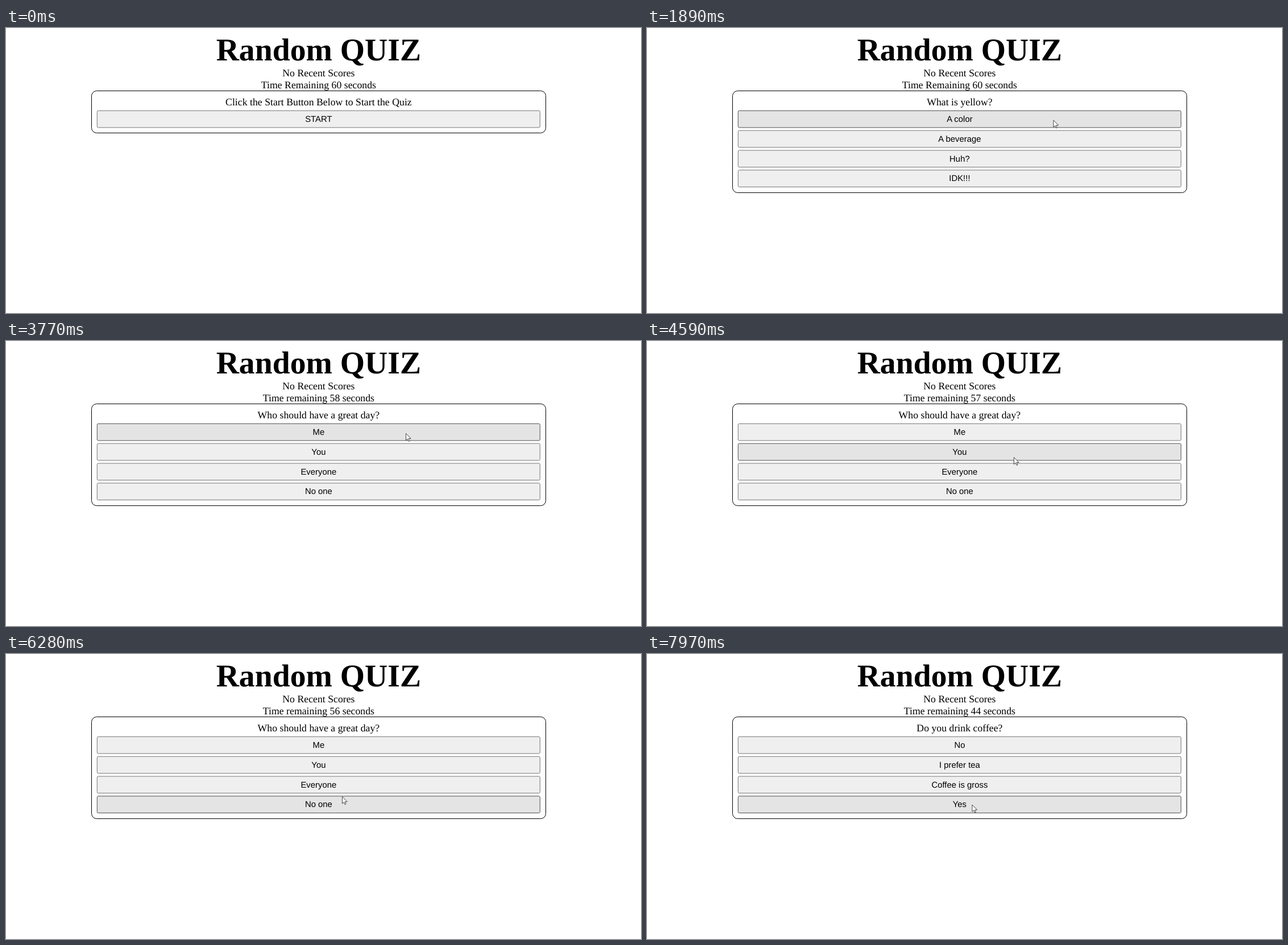
Recreate the animation shown at these times as an HTML page. Size 1117 by 501 pixels, loop 8 s.

```html
<!DOCTYPE html>
<html lang="en">
<head>
<meta charset="utf-8">
<title>Random QUIZ</title>
<style>
  html, body { margin: 0; width: 100%; height: 100%; overflow: hidden; background: #fff; }
  svg { display: block; }
  text { text-anchor: middle; text-rendering: geometricPrecision; fill: #000; }
  .serif { font: 17.78px "Liberation Serif", "Times New Roman", serif; }
  .title { font: bold 55.7px "Liberation Serif", "Times New Roman", serif; }
  .label { font: 14.9px "Liberation Sans", Arial, sans-serif; }
</style>
</head>
<body>
<svg id="stage" width="1117" height="501" viewBox="0 0 1117 501"></svg>
<script>
const LOOP = 8000;
const CENTER = 549.9;
const PITCH = 34.8;
const BUTTON = { x: 160.3, y: 145.4, width: 779, height: 29.6 };

const stage = document.getElementById('stage');

function set(node, attrs) {
  for (const key in attrs) node.setAttribute(key, attrs[key]);
}

function add(tag, attrs, text = '') {
  const node = document.createElementNS('http://www.w3.org/2000/svg', tag);
  set(node, attrs);
  node.textContent = text;
  stage.appendChild(node);
  return node;
}

function addText(cls, y, text) {
  return add('text', { class: cls, x: CENTER, y }, text);
}

const show = visible => ({ visibility: visible ? 'visible' : 'hidden' });

// A press on one screen leads to the next
const screens = [
  { start: 0, press: 1430, question: 'Click the Start Button Below to Start the Quiz',
    answers: ['START'] },
  { start: 1560, press: 2710, question: 'What is yellow?',
    answers: ['A color', 'A beverage', 'Huh?', 'IDK!!!'] },
  { start: 3770, press: 6740, question: 'Who should have a great day?',
    answers: ['Me', 'You', 'Everyone', 'No one'] },
  { start: 6870, press: LOOP, question: 'Do you drink coffee?',
    answers: ['No', 'I prefer tea', 'Coffee is gross', 'Yes'] }
];

const TICK = 1010;
const CLOCK_START = 1550;
const PENALTY = 10;

// The pointer glides to each stop, arriving at the given time
const ENTER = 200;
const GLIDE = 280;
const STEP = 68;
const stops = [
  { at: 1140, x: 714.5, y: 161.5 },
  { at: 2640, x: 703, y: 162 },
  { at: 4260, x: 645, y: 204 },
  { at: 5400, x: 621.5, y: 211.5 },
  { at: 5940, x: 590, y: 257 },
  { at: 6350, x: 592, y: 244 },
  { at: 7540, x: 583, y: 198 },
  { at: 7970, x: 571.5, y: 264.5 }
];

const looks = {
  normal: { fill: '#efefef', stroke: '#767676' },
  hover: { fill: '#e4e4e4', stroke: '#4f4f4f' },
  active: { fill: '#f5f5f5', stroke: '#8d8d8d' }
};

addText('title', 56.5, 'Random QUIZ');
addText('serif', 85.3, 'No Recent Scores');
const timer = addText('serif', 105.5, '');
const card = add('rect', {
  x: 150.5, y: 110.5, width: 799, rx: 9, fill: 'none', stroke: '#000'
});
const prompt = addText('serif', 135.8, '');
const buttons = [0, 1, 2, 3].map(i => {
  const y = BUTTON.y + PITCH * i;
  return {
    top: y,
    box: add('rect', { ...BUTTON, y, rx: 2 }),
    label: addText('label', y + 19.6, '')
  };
});
const halo = add('circle', { r: 11, fill: '#f9f678' });
const pointer = add('path', {
  d: 'M0 0V12.3L2.8 9.7L4.7 14L6.5 13.2L4.7 9H8.7Z',
  fill: '#fff', stroke: '#333', 'stroke-width': 0.9, 'stroke-linejoin': 'round'
});

const clamp = p => Math.max(0, Math.min(1, p));
const smooth = p => p * p * (3 - 2 * p);
const easeOut = p => 1 - (1 - p) ** 3;

function pointerAt(t) {
  let x = 979, y = 451;
  stops.forEach((stop, i) => {
    const time = i ? GLIDE : stop.at - ENTER;
    // Motion is sampled in coarse steps that land on the arrival
    const left = Math.ceil((stop.at - t) / STEP) * STEP;
    const p = (i ? smooth : easeOut)(clamp(1 - left / time));
    x += (stop.x - x) * p;
    y += (stop.y - y) * p;
  });
  return { x, y };
}

function secondsAt(t) {
  const ticks = Math.max(0, Math.floor((t - CLOCK_START) / TICK));
  return 60 - ticks - (t >= screens[3].start ? PENALTY : 0);
}

function draw(t) {
  const { press, question, answers } = screens.filter(s => s.start <= t).pop();
  const seconds = secondsAt(t);
  const { x, y } = pointerAt(t);
  const entered = t >= ENTER;
  const pressed = t >= press;

  timer.textContent = `Time ${seconds === 60 ? 'Remaining' : 'remaining'} ${seconds} seconds`;
  prompt.textContent = question;
  card.setAttribute('height', 74 + (answers.length - 1) * 35);

  buttons.forEach(({ top, box, label }, i) => {
    const over = entered && y >= top && y <= top + BUTTON.height;
    const look = !over ? 'normal' : pressed ? 'active' : 'hover';
    set(box, { ...looks[look], ...show(i < answers.length) });
    label.textContent = answers[i] || '';
  });

  set(halo, { cx: x, cy: y, ...show(pressed) });
  set(pointer, { transform: `translate(${x + 0.5} ${y + 0.5})`, ...show(entered) });
}

const start = performance.now();
function tick() {
  draw((performance.now() - start) % LOOP);
  requestAnimationFrame(tick);
}
tick();
</script>
</body>
</html>
```
